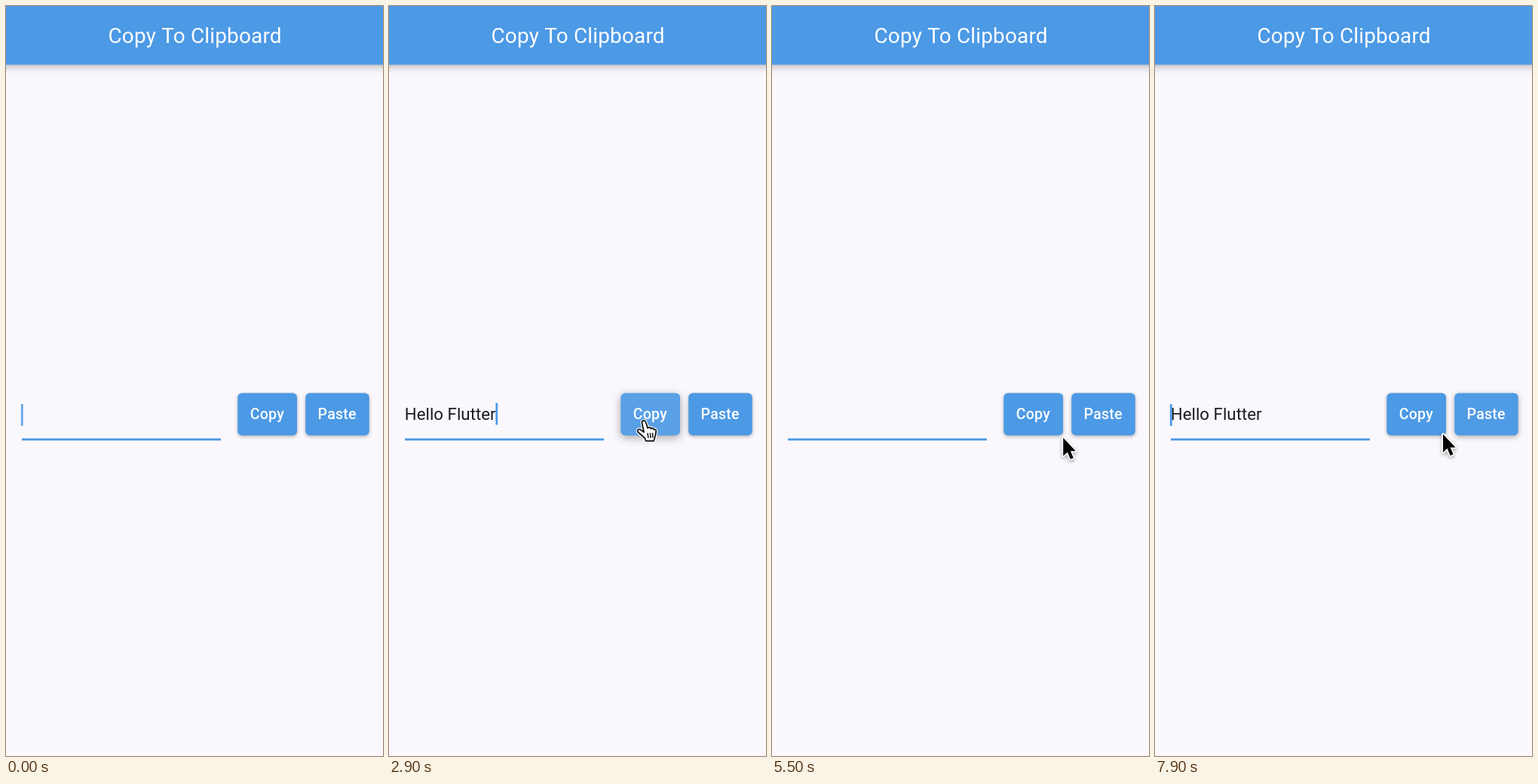
Recreate the animation shown at these times as an HTML page with a canvas. Size 500x993 px, loop 8 s.

```html
<!DOCTYPE html>
<html lang="en">
<head>
<meta charset="utf-8">
<title>Copy To Clipboard</title>
<style>
html, body { margin: 0; width: 100%; height: 100%; overflow: hidden; background: #faf8fc; }
canvas { display: block; }
</style>
</head>
<body>
<canvas id="stage" width="500" height="993"></canvas>
<script>
const ctx = document.getElementById('stage').getContext('2d');
const LOOP = 8000, BLUE = '#4c99e5', MESSAGE = 'Hello Flutter';
const FIELD_X = 20.8, FIELD_FONT = '22.3px Roboto, sans-serif';
const SELECT = 3700, ERASE = 4400, PASTE = 6690;

const buttons = [
  { label: 'Copy', x: 307.3, w: 78.7, enter: 1760, leave: 3080, down: 2230, up: 2350, at: [346, 551] },
  { label: 'Paste', x: 397.2, w: 84.5, enter: 5640, leave: 7760, down: 6540, up: 6680, at: [422, 561] }
];
const BTN_Y = 512.5, BTN_H = 56;

const keyTimes = [500, 640, 750, 850];
for (let i = 1; i < 10; i++) keyTimes.push(895 + i * 56);

// Pointer tracks: [time, x, y]; the pointer is hidden between tracks.
const tracks = [
  [[1400, 103, 602], [1500, 108, 597], [1600, 175, 580], [1700, 285, 556], [1800, 345, 549],
   [2850, 345, 549], [3100, 303, 548], [3300, 255, 552], [3600, 200, 557], [3700, 147, 557],
   [3900, 70, 557], [4100, 6, 557], [4400, 6, 557]],
  [[4900, 60, 642], [5100, 185, 671], [5300, 300, 640], [5500, 386, 572], [5600, 408, 556],
   [5750, 430, 553], [6000, 424, 563], [6300, 421, 560], [7580, 421, 560], [7850, 382, 567], [8000, 382, 567]]
];

const clamp = v => Math.max(0, Math.min(1, v));
const mix = (a, b, k) => a + (b - a) * k;
const easeOut = k => 1 - (1 - k) ** 2;

function pointerAt(t) {
  for (const track of tracks) {
    for (let i = 1; i < track.length; i++) {
      const [a, ax, ay] = track[i - 1], [b, bx, by] = track[i];
      if (t >= a && t < b) {
        const k = (t - a) / (b - a);
        return [mix(ax, bx, k), mix(ay, by, k)];
      }
    }
  }
  return null;
}

function text(str, x, y, font, color, spacing = 0) {
  ctx.font = font;
  ctx.letterSpacing = spacing + 'px';
  ctx.fillStyle = color;
  ctx.fillText(str, x, y);
  ctx.letterSpacing = '0px';
}

function shadow(alpha, blur, dy) {
  ctx.shadowColor = `rgba(0,0,0,${alpha})`;
  ctx.shadowBlur = blur;
  ctx.shadowOffsetY = dy;
}

function drawHeader() {
  ctx.save();
  shadow(.26, 10, 3);
  ctx.fillStyle = BLUE;
  ctx.fillRect(-20, -20, 540, 97.7);
  ctx.restore();
  ctx.textAlign = 'center';
  text('Copy To Clipboard', 250.6, 48.8, '27.9px Roboto, sans-serif', '#fff', .2);
  ctx.textAlign = 'left';
}

function drawRipple(b, t) {
  if (t < b.down) return;
  const full = Math.hypot(b.w, BTN_H) / 2 + 6;
  const pressed = easeOut(clamp((Math.min(t, b.up) - b.down) / 1000));
  const grown = t < b.up ? pressed : mix(pressed, 1, easeOut(clamp((t - b.up) / 225)));
  const fade = clamp((t - b.down) / 70) * (1 - clamp((t - b.up - 225) / 150));
  ctx.fillStyle = `rgba(255,255,255,${.2 * fade})`;
  ctx.beginPath();
  ctx.arc(mix(b.at[0], b.x + b.w / 2, grown), mix(b.at[1], BTN_Y + BTN_H / 2, grown),
    mix(full * .3, full, grown), 0, 7);
  ctx.fill();
}

function drawButton(b, t) {
  const hover = clamp((t - b.enter) / 200) * (1 - clamp((t - b.leave) / 200));
  ctx.save();
  ctx.beginPath();
  ctx.roundRect(b.x, BTN_Y, b.w, BTN_H, 5.6);
  ctx.save();
  shadow(mix(.3, .34, hover), mix(5, 12, hover), mix(1.5, 3, hover));
  ctx.fillStyle = BLUE;
  ctx.fill();
  ctx.restore();
  ctx.clip();
  ctx.fillStyle = `rgba(255,255,255,${.07 * hover})`;
  ctx.fillRect(b.x, BTN_Y, b.w, BTN_H);
  drawRipple(b, t);
  ctx.restore();
  text(b.label, b.x + 16.4, 547.4, '500 19.5px Roboto, sans-serif', '#fff', .25);
}

function caretAlpha(t) {
  if (t < keyTimes[0]) return clamp(.85 - t / 250);
  const start = t < ERASE ? 1900 : 5030;
  if (t < start) return 1;
  const phase = (t - start) % 1000;
  return phase < 500 ? clamp(1 - phase / 250) : clamp((phase - 500) / 250);
}

function drawField(t, pointer) {
  const typed = t < ERASE ? keyTimes.filter(k => k <= t).length : 0;
  const value = t >= PASTE ? MESSAGE : MESSAGE.slice(0, typed);
  ctx.font = FIELD_FONT;
  const edge = n => FIELD_X + ctx.measureText(MESSAGE.slice(0, n)).width;
  const selecting = t >= SELECT && t < ERASE;
  if (selecting) {
    let from = MESSAGE.length;
    while (from > 0 && (edge(from) + edge(from - 1)) / 2 > pointer[0]) from--;
    ctx.fillStyle = 'rgba(76,153,229,.4)';
    ctx.fillRect(edge(from), 527, edge(MESSAGE.length) - edge(from), 27);
  }
  text(value, FIELD_X, 548.3, FIELD_FONT, '#1d1b20');
  ctx.fillStyle = BLUE;
  ctx.fillRect(21, 572.5, 264, 2.8);
  if (!selecting) {
    ctx.globalAlpha = caretAlpha(t);
    ctx.fillRect(edge(typed) - (typed ? .2 : .9), typed ? 525.5 : 527, 2.8, 29);
    ctx.globalAlpha = 1;
  }
}

const arrow = new Path2D('M0 0V24L5.6 18.8L9.6 28.2L13.6 26.4L9.7 17.4H16.6Z');
const hand = new Path2D('M-1 3C-1.5-.5 3-1 4.3 2.5L6.6 10C8 8.4 10.4 9 11 10.8C12.6 9.6 14.6 10.3 15 12' +
  'C16.8 11.2 18.3 12.6 17.8 15L16.6 20.5L14.8 27H4.2L3 23.5L-6 15.5C-8.4 12-4.6 10.3-2 12.8L1.6 15.5Z');
const knuckles = new Path2D('M6.4 16.5L7.6 23M9.8 16.5L10.7 23M13 16.2L13.5 22.8');
const beam = new Path2D('M-6-13Q-1-13 0-9Q1-13 6-13M0-9V10M-6 14Q-1 14 0 10Q1 14 6 14M-3.5 4H3.5');

function stroke(path, color, width) {
  ctx.strokeStyle = color;
  ctx.lineWidth = width;
  ctx.stroke(path);
}

function drawPointer([x, y]) {
  const inRow = y > BTN_Y && y < 566;
  ctx.save();
  ctx.translate(x, y);
  ctx.lineJoin = 'round';
  if (inRow && buttons.some(b => x > b.x && x < b.x + b.w)) {
    stroke(hand, '#fff', 4);
    ctx.fillStyle = '#fff';
    ctx.fill(hand);
    stroke(hand, '#111', 1.8);
    stroke(knuckles, '#111', 1.5);
  } else if (inRow && x < 285) {
    stroke(beam, '#fff', 4.5);
    stroke(beam, '#111', 2);
  } else {
    ctx.save();
    shadow(.35, 4, 2);
    stroke(arrow, '#fff', 3.4);
    ctx.restore();
    ctx.fillStyle = '#000';
    ctx.fill(arrow);
  }
  ctx.restore();
}

function draw(now) {
  const t = now % LOOP;
  const pointer = pointerAt(t);
  ctx.fillStyle = '#faf8fc';
  ctx.fillRect(0, 0, 500, 993);
  drawHeader();
  drawField(t, pointer);
  buttons.forEach(b => drawButton(b, t));
  if (pointer) drawPointer(pointer);
  requestAnimationFrame(draw);
}
requestAnimationFrame(draw);
</script>
</body>
</html>
```
